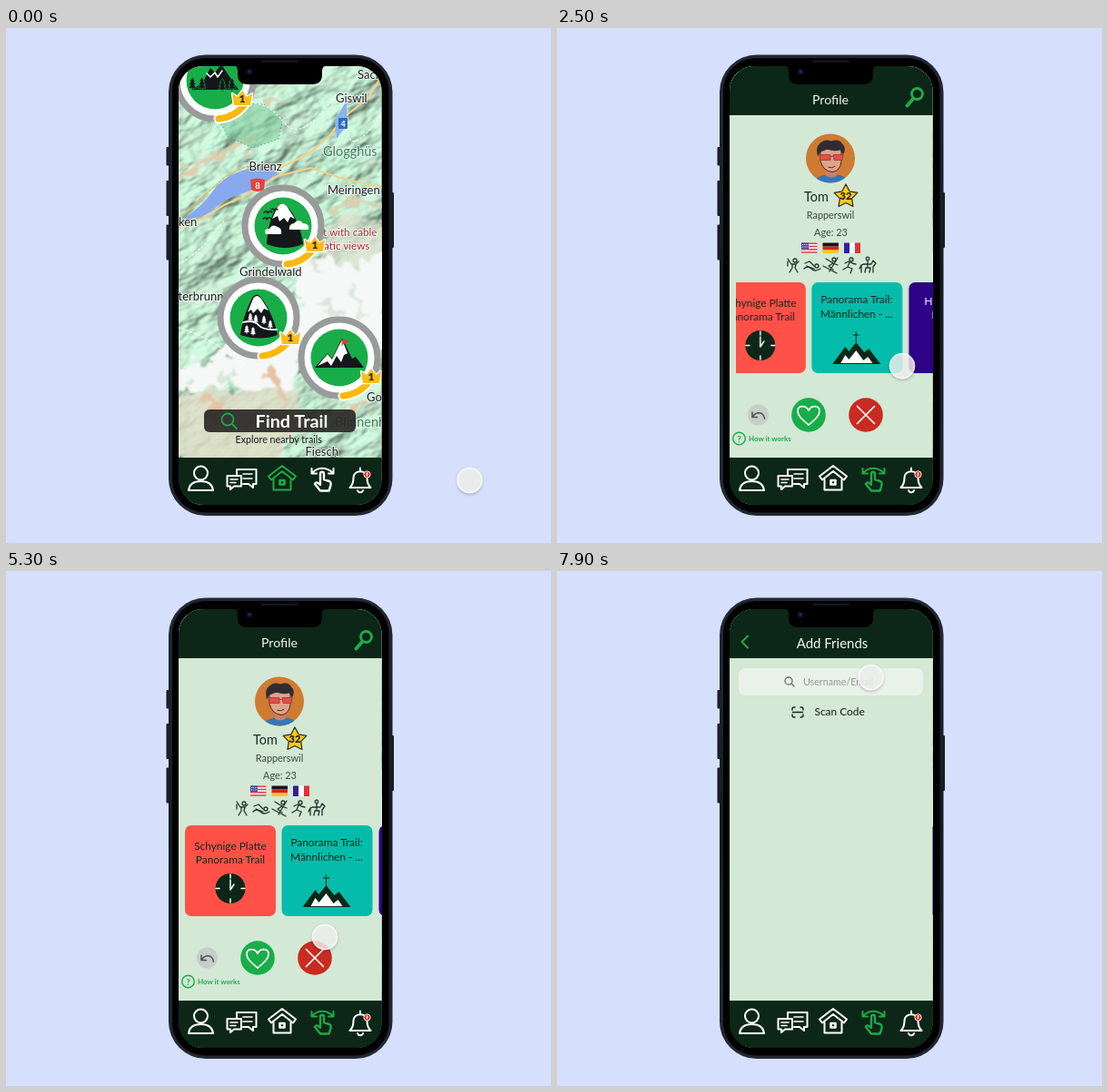
Recreate the animation shown at these times as an HTML page. Size 600 px wide and 567 px high, loop 8 s.

```html
<!DOCTYPE html>
<html lang="en">
<head>
<meta charset="utf-8">
<title>Trail app walkthrough</title>
<style>
html, body { margin: 0; width: 100%; height: 100%; overflow: hidden; background: #d6dffb; }
svg { display: block; }
#stage { width: 100vw; height: 100vh; }
text { font-family: Lato, "Open Sans", sans-serif; }
.mid { text-anchor: middle; }
.line { fill: none; stroke-linecap: round; stroke-linejoin: round; }
.place { font-size: 13px; fill: #1d1d1d; paint-order: stroke; stroke: #ffffffb0; stroke-width: 2px; }
.nature { fill: #2b8052; font-size: 14.5px; }
.view { fill: #a52d38; font-size: 11.7px; }
.title { fill: #f3f6f2; font-size: 14.2px; }
.card { font-size: 11.9px; fill: #14271c; text-anchor: middle; }
#profile, #friends, #cards, #cursor, #dot { animation: 8s linear infinite; }
#profile { animation-name: openProfile; }
#friends { animation-name: openFriends; }
#cards { animation-name: scroll; }
#cursor { animation-name: point; animation-timing-function: ease-in-out; }
#dot { animation-name: press; }
@keyframes openProfile {
  0% { transform: translateX(224px); }
  13.38% { transform: translateX(224px); animation-timing-function: ease-out; }
  17.13%, 100% { transform: translateX(0); }
}
@keyframes openFriends {
  0% { transform: translateX(224px); }
  88.54% { transform: translateX(224px); animation-timing-function: ease-out; }
  92.29%, 100% { transform: translateX(0); }
}
@keyframes scroll {
  0%, 29.5% { transform: translateX(0); }
  31.25% { transform: translateX(-23px); }
  38% { transform: translateX(-142px); animation-timing-function: ease-out; }
  45%, 50% { transform: translateX(-165px); animation-timing-function: ease-in-out; }
  58.5%, 100% { transform: translateX(0); }
}
@keyframes point {
  0%, 1.5% { transform: translate(510.5px, 498px); }
  11.5%, 18.5% { transform: translate(353px, 498px); }
  26.5%, 61.5% { transform: translate(380px, 372px); }
  66.25% { transform: translate(351px, 403px); }
  72% { transform: translate(347px, 409px); }
  83%, 91.5% { transform: translate(393.5px, 85px); }
  97.5%, 100% { transform: translate(345.5px, 117px); }
}
@keyframes press {
  0%, 12.4% { fill: #f1f2efcc; }
  13.2%, 15.4% { fill: #bfc3c1b8; }
  16.8%, 87.2% { fill: #f1f2efcc; }
  88%, 89.6% { fill: #bfc3c1b8; }
  91%, 100% { fill: #f1f2efcc; }
}
</style>
</head>
<body>
<svg id="stage" viewBox="0 0 600 567">
<defs>
  <clipPath id="screen"><rect x="190" y="42" width="223.500" height="483" rx="27"/></clipPath>
  <clipPath id="row"><rect x="197" y="275" width="217" height="110"/></clipPath>
  <clipPath id="face"><circle r="27"/></clipPath>
  <linearGradient id="rim" x2="0" y2="1">
    <stop stop-color="#232834"/><stop offset=".5" stop-color="#161a23"/><stop offset="1" stop-color="#232834"/>
  </linearGradient>
  <filter id="relief" x="0" y="0" width="1" height="1" color-interpolation-filters="sRGB">
    <feTurbulence type="fractalNoise" baseFrequency=".016 .03" numOctaves="4" seed="7"/>
    <feDiffuseLighting surfaceScale="9" diffuseConstant="1.2" lighting-color="#b8e2c7">
      <feDistantLight azimuth="235" elevation="58"/>
    </feDiffuseLighting>
  </filter>
  <filter id="glint" x="0" y="0" width="1" height="1" color-interpolation-filters="sRGB">
    <feTurbulence type="fractalNoise" baseFrequency=".03 .05" numOctaves="3" seed="23"/>
    <feColorMatrix values="0 0 0 0 .86  0 0 0 0 .94  0 0 0 0 .86  2.4 0 0 0 -1.05"/>
  </filter>
  <filter id="rough" color-interpolation-filters="sRGB">
    <feTurbulence type="fractalNoise" baseFrequency=".05" numOctaves="3" seed="4"/>
    <feDisplacementMap in="SourceGraphic" scale="36" xChannelSelector="R" yChannelSelector="G"/>
    <feGaussianBlur stdDeviation=".8"/>
  </filter>
  <filter id="shade" x="-.5" y="-.5" width="2" height="2"><feDropShadow dx="0" dy="1.500" stdDeviation="1.500" flood-opacity=".28"/></filter>

  <g id="badge">
    <circle r="42" fill="#fff" stroke="#999b9b" stroke-width="7"/>
    <g class="line">
      <path d="M4 42A42 42 0 0 0 33 26" stroke="#fff" stroke-width="11"/>
      <path d="M4 42A42 42 0 0 0 33 26" stroke="#f8b90f" stroke-width="7"/>
    </g>
    <circle r="31.500" fill="#18ad49"/>
  </g>
  <g id="crown">
    <path d="M-9 8L-11-5-5-1 0-8 5-1 11-5 9 8Z" fill="#fbbd16" stroke="#fff" stroke-width="2.500" stroke-linejoin="round" paint-order="stroke"/>
    <text class="mid" y="5" font-size="12" font-weight="900" fill="#372c24">1</text>
  </g>
  <path id="tree" d="M0-9L4-3H2L5 2H2.500L6 7H1V10H-1V7H-6L-2.500 2H-5L-2-3H-4Z"/>

  <g id="nav">
    <rect x="190" y="473" width="230" height="52" fill="#0c2717"/>
    <g class="line" stroke="#fff" stroke-width="2">
      <circle cx="214.500" cy="490" r="7.500"/>
      <path d="M201 509C202 501 208 499 214.500 499S227 501 228 509Z"/>
      <path d="M254 492V486H275.500V502H272V506L267 502H261"/>
      <path d="M243.500 493H259V504.500H251L247 508V504.500H243.500Z"/>
      <path d="M261 491H271M261 496H271M247 497H255M247 500.500H253" stroke-width="1.600"/>
      <g style="stroke:var(--home,#fff)">
        <path d="M289 493.500L304 482 319 493.500 316 497.500 304 488 292 497.500Z"/>
        <path d="M294.500 497V508.500H313.500V497"/>
        <path d="M301.500 498H306.500V502.500H301.500Z" stroke-width="2.600"/>
      </g>
      <g style="stroke:var(--hand,#fff)">
        <path d="M337 490C343 483 353 483 360 490M336.500 485V490.500H342M360.500 485V490.500H355"/>
        <path d="M346 502V491C346 488 350 488 350 491V497L356 499C358 500 358 502 357 505L355.500 509.500H346L340 502C341 499.500 343 500 346 503" stroke-width="2.400"/>
      </g>
      <path d="M378.500 506C382 503 382.500 500 382.500 495C382.500 486 397.500 486 397.500 495C397.500 500 398 503 401.500 506ZM387 509C388 512 392 512 393 509M390 487V484.500"/>
    </g>
    <circle cx="397.500" cy="491.500" r="3.700" fill="#d94b3e" stroke="#f4d8d2"/>
    <path d="M397.500 489.500V493" stroke="#fff"/>
  </g>

  <g id="page">
    <rect x="190" y="42" width="230" height="432" fill="#d3e8d5"/>
    <rect x="190" y="42" width="230" height="54" fill="#0c2717"/>
    <use href="#nav"/>
  </g>
</defs>

<rect width="600" height="567" fill="#d6dffb"/>

<g fill="#171c27">
  <rect x="176.500" y="131" width="5" height="20.500" rx="1"/>
  <rect x="176.500" y="168" width="5" height="39" rx="1"/>
  <rect x="176.500" y="216.500" width="5" height="39" rx="1"/>
  <rect x="422" y="181" width="5" height="61" rx="1"/>
</g>
<rect x="179" y="29.500" width="246.500" height="507.500" rx="41" fill="url(#rim)"/>
<rect x="183" y="33" width="238.500" height="500.500" rx="36" fill="#000"/>

<g clip-path="url(#screen)">
  <g id="home" style="--home:#20a846">
    <rect x="190" y="42" width="224" height="432" fill="#b3dcc0"/>
    <g transform="rotate(-28 301 258)">
      <rect x="90" y="-20" width="430" height="560" filter="url(#relief)" opacity=".85"/>
      <rect x="90" y="-20" width="430" height="560" filter="url(#glint)" opacity=".55"/>
    </g>
    <g filter="url(#rough)" class="line">
      <path d="M190 166L214 152 240 139 268 126" stroke="#dfcfae" stroke-width="8"/>
      <path d="M356 205L384 188 420 196M286 72L306 88" stroke="#d9d0b0" stroke-width="6"/>
      <path d="M350 218L380 205 420 214V305L370 312 330 300Z" fill="#dfe0ce" opacity=".7"/>
      <path d="M190 404L226 396 258 404 290 372 316 396 334 424 300 480H184V404Z" fill="#e2dcc6" opacity=".8"/>
      <path d="M322 262L350 248 384 260 420 248V352L380 338 336 350 316 392 268 402 244 388 208 400 184 392V376L226 362 250 352 316 326Z" fill="#f6f8f7"/>
      <path d="M334 256L352 268M384 286L396 312M350 300L362 322M232 378L248 388" stroke="#dce6dc" stroke-width="6"/>
      <path d="M290 378L312 408M222 412L250 440M372 424L398 416" stroke="#e6c3a4" stroke-width="9"/>
    </g>
    <path d="M233 97L254 82 284 84 305 100 300 122 272 132 244 120Z" fill="#76c695" opacity=".5"/>
    <path d="M233 97L254 82 284 84 305 100 300 122 272 132 244 120Z" fill="none" stroke="#55aa74" stroke-dasharray="1.500 2.500"/>
    <path d="M192 212C207 203 219 192 228 179S250 160 264 156L291 151 298 160C286 172 270 179 252 185S230 202 215 208Z" fill="#89a9ee"/>
    <g class="line">
      <path d="M190 219L216 210 240 195 264 184 299 163 336 154 368 165 414 176M300 155L334 138 356 119 372 98 398 78 414 52" stroke="#f3d08a" stroke-width="2.200"/>
      <path d="M190 210L222 181 241 164 263 153 300 151" stroke="#e3b65e" stroke-width="1.400" stroke-dasharray="3 2"/>
      <path d="M274 83Q290 84 306 104T350 90 376 103 414 95M190 260Q216 246 240 212M190 330Q226 340 264 372" stroke="#fff" stroke-width="1.200" stroke-dasharray="2 2.500" opacity=".8"/>
    </g>
    <path d="M362 102L376 78 374 108 364 122Z" fill="#8bb2ef"/>
    <rect x="366" y="99" width="10" height="12" rx="1" fill="#2d6cc0"/>
    <text class="mid" x="371" y="108.500" font-size="9" font-weight="700" fill="#fff">4</text>
    <path d="M269 167Q277 164 285 167L284 178Q277 182 270 178Z" fill="#e0463f"/>
    <text class="mid" x="277" y="176.500" font-size="9.500" font-weight="700" fill="#fff">8</text>
    <g class="place">
      <text x="387" y="56">Sachseln</text>
      <text x="363" y="82">Giswil</text>
      <text x="267.500" y="157">Brienz</text>
      <text x="354" y="183">Meiringen</text>
      <text x="190" y="218">ken</text>
      <text x="257" y="273">Grindelwald</text>
      <text x="189.500" y="300">terbrunn</text>
      <text x="397" y="411">Goms</text>
      <text x="329.500" y="471">Fiesch</text>
      <text class="nature" x="349" y="141">Glogghüs</text>
      <text class="nature" x="362" y="439">Blinnenhorn</text>
      <text class="view" x="349" y="229">t with cable</text>
      <text class="view" x="350" y="244">atic views</text>
    </g>

    <g transform="translate(230 58)">
      <use href="#badge"/>
      <path d="M-26 10L-14 3-5-14 0-9 7-18 26 10Z" fill="#15171a"/>
      <path d="M-9-8L-5-4 0-9 3-4 8-11" class="line" stroke="#fff" stroke-width="1.500"/>
      <g fill="#15171a" stroke="#18ad49" stroke-width=".8" transform="scale(.75)">
        <use href="#tree" x="-33" y="4"/><use href="#tree" x="-19" y="4"/><use href="#tree" x="11" y="6"/><use href="#tree" x="25" y="5"/>
      </g>
      <use href="#crown" x="30" y="19"/>
    </g>
    <g transform="translate(305 218)">
      <use href="#badge"/>
      <path d="M-18 20C-17 6-15-8-7-20Q-2-29 4-22C14-12 20 4 22 20Q2 28-18 20Z" fill="#15171a"/>
      <path d="M-12-8L-6-21Q-1-28 4-22L13-8 8-10 5-4 1-9-4-5-6-11Z" fill="#fff"/>
      <path d="M-19 9Q-22 3-15 3-12-3-6 1-1 2-2 9ZM7 4Q6-2 12-3 17-9 22-3 30-2 28 4Z" fill="#fff"/>
      <path d="M-21-15q3-3 4 1 2-4 5-1M-22-8q3-3 4 1 2-4 5-1M-13-18q2-2 3 1 2-3 4-1" class="line" stroke="#14231a" stroke-width="1.600"/>
      <use href="#crown" x="35" y="20"/>
    </g>
    <g transform="translate(278 319)">
      <use href="#badge"/>
      <path d="M-20 19C-18 4-13-10-7-22Q-2-29 3-22C12-10 18 4 21 19Q2 26-20 19Z" fill="#15171a"/>
      <path d="M-12-6L-6-21Q-2-27 3-21L11-8 6-10 3-5-1-10-6-5-8-9Z" fill="#fff"/>
      <path d="M-17 5Q-5 2 0 8T20 13" class="line" stroke="#fff" stroke-width="1.800"/>
      <g fill="#fff" transform="scale(.5)"><use href="#tree" x="-18" y="-2"/><use href="#tree" x="-6" y="2"/><use href="#tree" x="12" y="4"/><use href="#tree" x="-26" y="25"/><use href="#tree" x="-12" y="29"/><use href="#tree" x="26" y="14"/></g>
      <use href="#crown" x="35" y="21"/>
    </g>
    <g transform="translate(367 363)">
      <use href="#badge"/>
      <path d="M-27 11L-13-5-8 1 3-22 14 1 18-1 27 11Z" fill="#15171a"/>
      <path d="M-24 9L-13-4-8 2 3-20 9-5 5-3 2 5-3-2-9 9-13 4Z" fill="#fff"/>
      <path d="M3-21V-13M4-20L10-18 4-15Z" fill="#db3b30" stroke="#db3b30"/>
      <use href="#crown" x="35" y="20"/>
    </g>

    <rect x="218" y="420" width="167" height="25" rx="6" fill="#262524" opacity=".9"/>
    <g class="line" stroke="#1fa647" stroke-width="1.800"><circle cx="244" cy="431" r="6.500"/><path d="M249 436L254 441"/></g>
    <text x="274.500" y="439.500" font-size="19.800" font-weight="700" fill="#fff">Find Trail</text>
    <text x="252.500" y="457" font-size="10.700" fill="#1a1a1a">Explore nearby trails</text>
    <use href="#nav"/>
  </g>

  <g id="profile" style="--hand:#20a846">
    <use href="#page"/>
    <text class="title mid" x="301" y="84">Profile</text>
    <g class="line" stroke="#22a94a"><circle cx="396.500" cy="72.500" r="6" stroke-width="2.800"/><path d="M392 78L385.500 85.500" stroke-width="4"/></g>
    <g transform="translate(301 143.500)">
      <circle r="27" fill="#cf7b32"/>
      <g clip-path="url(#face)">
        <path d="M-19 28Q-17 20-5 18H8Q18 19 20 28Z" fill="#3577b8"/>
        <path d="M-5 8H7V19Q1 23-5 19Z" fill="#c98068"/>
        <path d="M-11-10H12V3Q11 14 2 15-8 14-11 3Z" fill="#dfa28a" stroke="#43302d"/>
        <path d="M-14-2Q-17-13-11-17-6-22 1-19 10-22 13-16 18-12 14-4L11-9Q3-7-3-10L-11-7Z" fill="#302c31"/>
        <path d="M-12-4H0V2H-11ZM3-4H14L13 2H4ZM0-2H3" fill="#e64d4a" stroke="#8e3c3b" stroke-width=".8"/>
        <path d="M-2 10Q2 11 5 9" class="line" stroke="#53352e"/>
      </g>
    </g>
    <text x="272" y="191" font-size="14.500" fill="#1d2b22">Tom</text>
    <path id="star" fill="#fccb17" stroke="#2d2a20" stroke-width="1.200" stroke-linejoin="round"/>
    <text class="mid" x="318" y="189" font-size="11" font-weight="900" fill="#262317">32</text>
    <g class="mid" font-size="10.900" fill="#3d4941"><text x="301" y="210">Rapperswil</text><text x="301.500" y="228.500">Age: 23</text></g>
    <g transform="translate(269 236.500)">
      <rect width="17.500" height="11.500" fill="#f4eeee"/>
      <path d="M0 .8H17.500M0 4H17.500M0 7.200H17.500M0 10.500H17.500" stroke="#d5414b" stroke-width="1.600"/>
      <rect width="8" height="6.500" fill="#3c4f9c"/>
      <path d="M1 2H8M1 4.500H8" stroke="#fff" stroke-dasharray="1 1.200"/>
      <path d="M23.500 0H41V4H23.500Z" fill="#151515"/><path d="M23.500 4H41V8H23.500Z" fill="#d81f25"/><path d="M23.500 8H41V11.500H23.500Z" fill="#f7c919"/>
      <path d="M47 0H53V11.500H47Z" fill="#32209b"/><path d="M53 0H59V11.500H53Z" fill="#fff"/><path d="M59 0H65V11.500H59Z" fill="#e23338"/>
    </g>
    <g class="line" stroke="#26342c" stroke-width="1.300">
      <circle cx="262" cy="256" r="2"/><path d="M254 254L258 260 263 260 266 257M259 260V264L256 269M263 260L262 264 265 269M254 257V262"/>
      <circle cx="286" cy="262" r="2"/><path d="M273 259L278 257 283 262M272 265Q276 261 280 265T290 265M275 262L283 265"/>
      <circle cx="305" cy="255" r="2"/><path d="M296 254L304 259 299 262 304 266M293 262L308 270M309 253L300 268M304 259L309 261"/>
      <circle cx="324" cy="255" r="2"/><path d="M317 259L321 257 325 259 329 260M322 258L320 263 325 265 323 270M320 263L315 266"/>
      <circle cx="342" cy="254" r="1.800"/><path d="M335 269V262Q335 260 339 260H346L348 256 351 259 348 263V269M339 269L340 264H345L344 269M342 256V264M335 261L333 265"/>
    </g>

    <g clip-path="url(#row)">
      <g id="cards">
        <g transform="translate(197 280)">
          <rect width="100" height="100" rx="7" fill="#ff5148"/>
          <g class="card"><text x="50" y="26.500">Schynige Platte</text><text x="50" y="42">Panorama Trail</text></g>
          <circle cx="50" cy="69.500" r="16.500" fill="#0c2717"/>
          <path d="M50 54V58M50 81V85M34 69.500H38M62 69.500H66M50 60V71L54 65" class="line" stroke="#fff" stroke-width="1.500"/>
        </g>
        <g transform="translate(303.500 280)">
          <rect width="100" height="100" rx="7" fill="#04bca9"/>
          <g class="card"><text x="49.500" y="23">Panorama Trail:</text><text x="49.500" y="38.500">Männlichen - ...</text></g>
          <path d="M49 54V68M45.500 58H52.500" stroke="#0c2717"/>
          <path d="M23 90L37 71 41 76 49 66 58 77 63 73 76 90Z" fill="#0c2717"/>
          <path d="M32 89L37 80 41 85 49 75 57 86 62 82 67 89Z" fill="#fff"/>
        </g>
        <g transform="translate(410.500 280)">
          <rect width="100" height="100" rx="7" fill="#2d0287"/>
          <g class="card" style="fill:#fff"><text x="50" y="24.500">Harder Kulm</text><text x="50" y="40">Loop Trail</text></g>
          <g transform="translate(49.500 71)">
            <path d="M-21 16L-14-5-7-1V12ZM-5 12V1L0 8 6 1V12L-1 16ZM8 12V-1L15-5 21 16Z" fill="#fff"/>
            <path d="M0 8C-4 1-9-5-9-11A9 9 0 0 1 9-11C9-5 4 1 0 8Z" fill="#fff" stroke="#2d0287" stroke-width="1.500"/>
            <circle cy="-11" r="4" fill="#2d0287"/>
          </g>
        </g>
        <g transform="translate(516 280)">
          <rect width="100" height="100" rx="7" fill="#f8ca0b"/>
          <g class="card"><text x="51" y="18.500">Harder Kulm -</text><text x="51" y="34">Interlaken</text></g>
          <circle cx="51" cy="51" r="6" fill="#0c2717"/>
          <path d="M33 48L40 60 53 62 64 57M49 63L47 74 48 92M49 74L64 74 62 58" class="line" stroke="#0c2717" stroke-width="4.500"/>
        </g>
      </g>
    </g>

    <circle cx="221.500" cy="426" r="11.500" fill="#c7cec9"/>
    <path d="M215 423V428.500H220.500M215.500 428C219 422 227 422 228.500 430" class="line" stroke="#4b5550" stroke-width="1.500"/>
    <circle cx="277" cy="426" r="18.800" fill="#18ad49"/>
    <path d="M277 437C270 431 265 427 265 422C265 415 274 415 277 421C280 415 289 415 289 422C289 427 284 431 277 437Z" class="line" stroke="#fff" stroke-width="1.700"/>
    <circle cx="340" cy="426" r="18.800" fill="#c92b20"/>
    <path d="M330.500 416.500L349.500 435.500M349.500 416.500L330.500 435.500" class="line" stroke="#fff" stroke-width="1.700"/>
    <circle cx="200.500" cy="452" r="6.800" fill="none" stroke="#22a94a" stroke-width="1.400"/>
    <g fill="#22a94a" font-weight="700"><text class="mid" x="200.500" y="455.700" font-size="10">?</text><text x="211" y="454.700" font-size="7.900">How it works</text></g>
  </g>

  <g id="friends" style="--hand:#20a846">
    <use href="#page"/>
    <text class="title mid" x="303" y="84.500" style="font-size:15px">Add Friends</text>
    <path d="M210 71.500L203.500 78 210 84.500" class="line" stroke="#22a94a" stroke-width="2"/>
    <rect x="200" y="107" width="203" height="30" rx="7" fill="#e9f2e9"/>
    <g class="line" stroke="#68706b" stroke-width="1.300"><circle cx="255" cy="121" r="4"/><path d="M258 124L261 127"/></g>
    <text x="271" y="125.500" font-size="10.700" fill="#929a94">Username/Email</text>
    <path d="M259 153V152Q259 150 261 150H262M268 150H269Q271 150 271 152V153M271 158V159Q271 161 269 161H268M262 161H261Q259 161 259 159V158M259.500 155.500H270.500" class="line" stroke="#16271c" stroke-width="1.400"/>
    <text x="283.500" y="159" font-size="11.900" fill="#111c15">Scan Code</text>
  </g>
</g>

<path d="M250 41H353Q348 42 348 47V51Q348 62 337 62H266Q255 62 255 51V47Q255 42 250 41Z" fill="#000"/>
<rect x="281" y="35.500" width="41" height="2.500" rx="1.200" fill="#15171b"/>
<circle cx="268" cy="48" r="3.500" fill="#0c1027"/><circle cx="268" cy="48" r="1.500" fill="#232c62"/>

<g id="cursor">
  <circle id="dot" r="13.500" fill="#f1f2efcc" stroke="#ffffffcc" stroke-width="1.500" filter="url(#shade)"/>
</g>
</svg>
<script>
const spike = (_, i) => {
  const a = (i * 36 - 90) * Math.PI / 180, r = i % 2 ? 7 : 13.5;
  return `${318 + r * Math.cos(a)} ${185.5 + r * Math.sin(a)}`;
};
document.getElementById('star').setAttribute('d', `M${Array.from({ length: 10 }, spike).join('L')}Z`);
</script>
</body>
</html>
```
